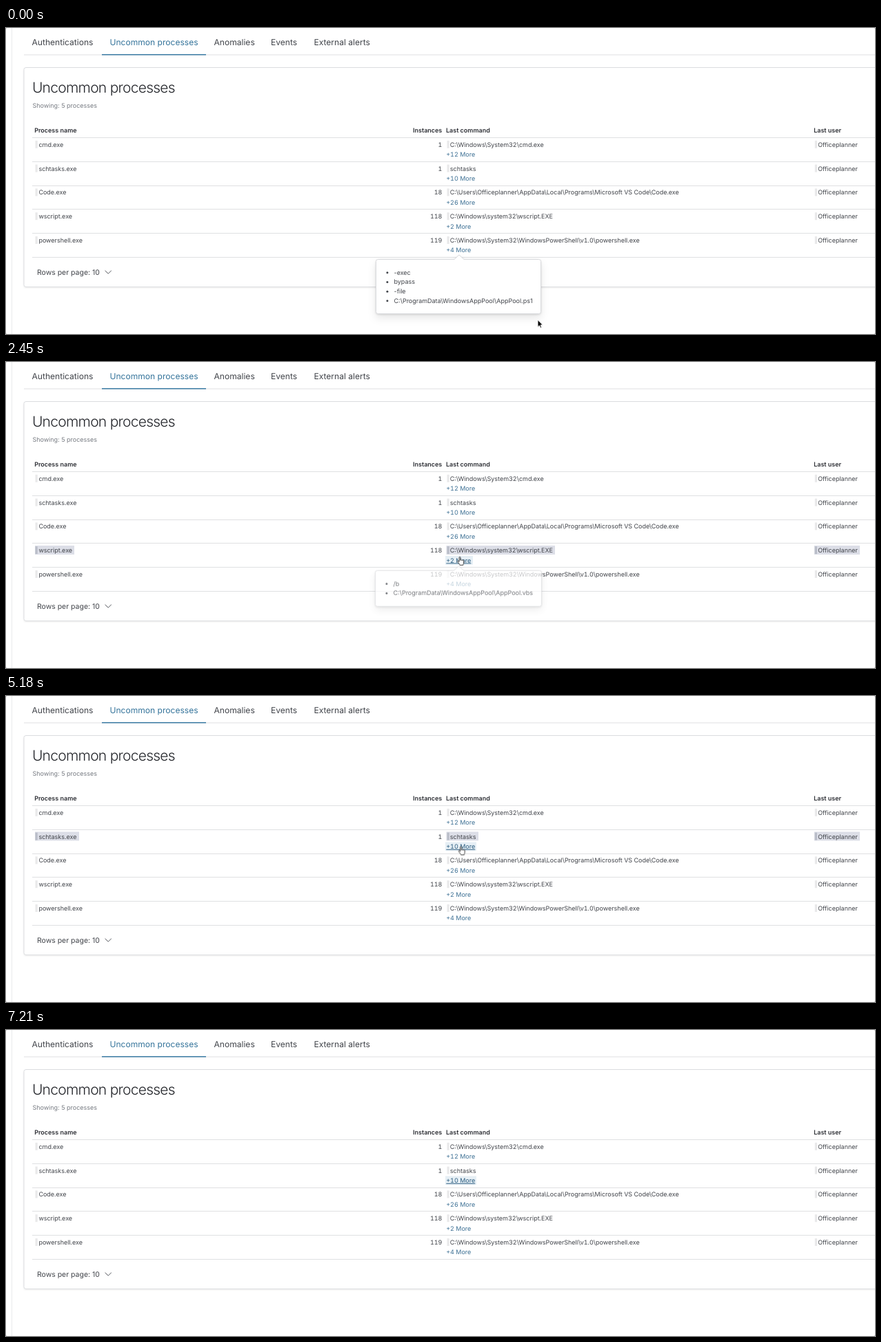
Animation, 1260 px wide and 445 px high, one loop 7.28 s. Source, as an HTML page:

```html
<!DOCTYPE html>
<html lang="en">
<head>
<meta charset="utf-8">
<title>Uncommon processes</title>
<style>
  html, body { margin: 0; width: 100%; height: 100%; overflow: hidden; background: #fff; }
  svg { display: block; width: 1260px; height: 445px; overflow: hidden; }
  text { font: 8.99px Inter, sans-serif; fill: #41444a; text-rendering: geometricPrecision; white-space: pre; }
  .tab { font-size: 12.07px; }
  .active { fill: #35749b; }
  .title { font-size: 21px; font-weight: 300; letter-spacing: -.035em; fill: #24262b; }
  .muted { fill: #777b82; }
  .head { font-weight: 600; fill: #2b2d33; }
  .pager { font-size: 10.47px; }
  .num { text-anchor: end; }
  #table text { font-variant-numeric: tabular-nums; }
  #table .link { fill: #3d7094; }
  #table .hover { fill: #2b5c7f; text-decoration: underline; }
  .rule { stroke: #dfe0e2; fill: none; }
  .bar { fill: #e9e9ea; }
  .mark { fill: #dcdee7; }
  .markbar { fill: #b9bdc8; }
  .glow { fill: #e6eff5; }
  .bubble { fill: #fff; stroke: #d9dadd; filter: drop-shadow(0 1px 1.5px rgba(0,0,0,.12)) drop-shadow(0 6px 6px rgba(0,0,0,.09)); }
  .panel { fill: #fff; stroke: #dcdde0; filter: drop-shadow(0 1.5px 1px rgba(0,0,0,.08)); }
</style>
</head>
<body>
<svg viewBox="0 0 1260 445">
  <rect width="1260" height="445" fill="#ccc"/>
  <rect width="1260" height="445" rx="2" fill="#fff"/>
  <path d="M8.5 0V445" stroke="#e9eaec"/>
  <path class="rule" d="M26 39H1260"/>
  <path d="M139 38.75H290" stroke="#3d7da6" stroke-width="1.5"/>
  <text class="tab" x="37.5" y="25">Authentications</text>
  <text class="tab active" x="150.5" y="25">Uncommon processes</text>
  <text class="tab" x="301.5" y="25">Anomalies</text>
  <text class="tab" x="384" y="25">Events</text>
  <text class="tab" x="446.4" y="25">External alerts</text>

  <rect class="panel" x="26" y="57.5" width="1260" height="319" rx="3"/>
  <text class="title" x="37.9" y="93.5">Uncommon processes</text>
  <text class="muted" x="38.4" y="116.3">Showing: 5 processes</text>
  <text class="head" x="41.2" y="152.2">Process name</text>
  <text class="head num" x="632.3" y="152.2">Instances</text>
  <text class="head" x="638" y="152.2">Last command</text>
  <text class="head" x="1171.2" y="152.2">Last user</text>
  <g id="table"></g>
  <text class="pager" x="45" y="358.8">Rows per page: 10</text>
  <path d="M143.6 352.8l4.6 4.4 4.6-4.4" fill="none" stroke="#55585e"/>

  <g id="popovers"></g>

  <g id="cursor" stroke="#fff" stroke-width=".9" stroke-linejoin="round">
    <path id="arrow" d="M0 0V10.4L2.4 8.2 4 11.8 5.7 11 4.1 7.6H7.4Z" fill="#000"/>
    <path id="hand" transform="translate(-3.9 -.6)" fill="#fff" stroke="#222"
      d="M3 7.6V1.5a.9.9 0 0 1 1.8 0V5.4a.9.9 0 0 1 1.7.1.9.9 0 0 1 1.6.3.8.8 0 0 1 1.5.5V9c0 1-.8 1.8-.9 3.6H4C3.6 11 1.6 9.2.7 7.6c-.5-.9.6-1.6 1.3-.9z"/>
  </g>
</svg>
<script>
const LOOP = 7280;
const USER = 'Officeplanner';
const byId = id => document.getElementById(id);

function add(parent, tag, attrs = {}, text = '') {
  const el = document.createElementNS('http://www.w3.org/2000/svg', tag);
  for (const key in attrs) el.setAttribute(key, attrs[key]);
  el.textContent = text;
  return parent.appendChild(el);
}

// Each frame is [time in ms, properties, easing to the next frame].
function play(el, frames) {
  const keys = frames.map(([ms, props, easing = 'linear']) => ({ offset: ms / LOOP, easing, ...props }));
  el.animate(keys, { duration: LOOP, iterations: Infinity });
}

function showDuring(el, ...spans) {
  const at = (ms, opacity) => [ms, { opacity }, 'step-end'];
  const frames = spans.flatMap(([from, to]) => [at(from, 1), at(to, +(to === LOOP))]);
  if (frames[0][0] > 0) frames.unshift(at(0, 0));
  if (frames.at(-1)[0] < LOOP) frames.push(at(LOOP, 0));
  play(el, frames);
}

// mark: row highlight [from, to, name end, command end]; focus: link state [from, to]
const rows = [
  { name: 'cmd.exe', count: 1, command: 'C:\\Windows\\System32\\cmd.exe', more: 12 },
  { name: 'schtasks.exe', count: 1, command: 'schtasks', more: 10,
    mark: [4760, 7070, 106, 685], focus: [4830, LOOP] },
  { name: 'Code.exe', count: 18, more: 26, mark: [4655, 4760, 91, 981],
    command: `C:\\Users\\${USER}\\AppData\\Local\\Programs\\Microsoft VS Code\\Code.exe` },
  { name: 'wscript.exe', count: 118, command: 'C:\\Windows\\system32\\wscript.EXE', more: 2,
    mark: [1750, 4655, 99, 796], focus: [1890, 5110] },
  { name: 'powershell.exe', count: 119, more: 4, mark: [950, 1750, 114, 919.5], focus: [1080, 2310],
    command: 'C:\\Windows\\System32\\WindowsPowerShell\\v1.0\\powershell.exe' },
];

function drawRow(row, i) {
  const table = byId('table');
  const y = 172.8 + 34.8 * i;
  const lineY = Math.round(159 + 34.8 * i) + .5;
  const bars = (parent, cls) => [42.5, 639.5, 1172.8].forEach(x =>
    add(parent, 'rect', { class: cls, x, y: y - 9, width: 3.2, height: 11 }));

  add(table, 'path', { class: 'rule', d: `M38 ${lineY}H1260` });
  bars(table, 'bar');
  if (row.mark) {
    const [from, to, nameEnd, commandEnd] = row.mark;
    const mark = add(table, 'g');
    [[42, nameEnd], [638.5, commandEnd], [1171.8, 1238]].forEach(([x, end]) =>
      add(mark, 'rect', { class: 'mark', x, y: y - 10.2, width: end - x, height: 13 }));
    bars(mark, 'markbar');
    showDuring(mark, [from, to]);
  }
  add(table, 'text', { x: 47.4, y }, row.name);
  add(table, 'text', { class: 'num', x: 632.4, y }, row.count);
  add(table, 'text', { x: 643.8, y }, row.command);
  add(table, 'text', { x: 1177.2, y }, USER);

  const label = `+${row.more} More`;
  const link = { class: 'link', x: 638.3, y: y + 14.3 };
  const text = add(table, 'text', link, label);
  if (row.focus) {
    const state = add(table, 'g');
    add(state, 'rect', { class: 'glow', x: 637, y: y + 4.8, width: row.more > 9 ? 45 : 40, height: 12.6 });
    add(state, 'text', { ...link, class: 'link hover' }, label);
    showDuring(state, row.focus);
  }
}

rows.forEach(drawRow);
add(byId('table'), 'path', { class: 'rule', d: 'M38 333.5H1260' });

const popovers = [
  { x: 536.5, y: 336.5, w: 239, h: 79, tip: 657, close: 1200,
    items: ['-exec', 'bypass', '-file', 'C:\\ProgramData\\WindowsAppPool\\AppPool.ps1'] },
  { x: 535.5, y: 301.5, w: 241, h: 52, tip: 656.5, open: 2310, close: 4200,
    items: ['/b', 'C:\\ProgramData\\WindowsAppPool\\AppPool.vbs'] },
  { x: 608.5, y: 232.5, w: 101.5, h: 119.5, tip: 659, open: 5250, close: 6300,
    items: ['/create', '/F', '/sc', 'minute', '/mo'], note: '5 more not shown' },
];

function drawPopover({ x, y, w, h, tip, open, close, items, note }) {
  const g = add(byId('popovers'), 'g');
  add(g, 'path', { class: 'bubble', d: `M${x + 3} ${y}H${tip - 7}l7-6.5 7 6.5H${x + w - 3}a3 3 0 0 1 3 3v${h - 6}` +
    `a3 3 0 0 1-3 3h${6 - w}a3 3 0 0 1-3-3v${6 - h}a3 3 0 0 1 3-3z` });
  items.forEach((item, i) => {
    const base = y + 22.2 + 13.67 * i;
    add(g, 'circle', { cx: x + 16.4, cy: base - 2.9, r: 1.5, fill: '#41444a' });
    add(g, 'text', { x: x + 26, y: base }, item);
  });
  if (note) add(g, 'text', { class: 'muted', x: x + 12.2, y: y + 103.6 }, note);

  const shown = { opacity: 1, transform: 'translateY(0px)' };
  const hidden = { opacity: 0, transform: 'translateY(6px)' };
  const opening = open
    ? [[0, hidden], [open, hidden, 'ease-out'], [open + 270, shown]]
    : [[0, shown]];
  play(g, [...opening, [close, shown, 'ease-out'], [close + 270, hidden], [LOOP, hidden]]);
}

popovers.forEach(drawPopover);

const path = [
  [0, 771, 424.5], [70, 771, 424.5], [350, 803, 405], [600, 813, 378], [800, 790, 352],
  [950, 715, 332], [1100, 655.5, 322.5], [1540, 655.5, 322.5], [1960, 658, 283.4],
  [4340, 658, 283.4], [4480, 657, 279], [4550, 656, 271], [4690, 657, 240], [4830, 659, 221],
  [4970, 659.5, 219], [6580, 659.5, 219], [6800, 670, 300], [7000, 690, 414],
  [7070, 695, 429], [7140, 700, 455], [LOOP, 700, 455],
];
play(byId('cursor'), path.map(([ms, x, y]) => [ms, { transform: `translate(${x}px, ${y}px)` }]));
showDuring(byId('arrow'), [0, 1050], [6650, LOOP]);
showDuring(byId('hand'), [1050, 6650]);
</script>
</body>
</html>
```
